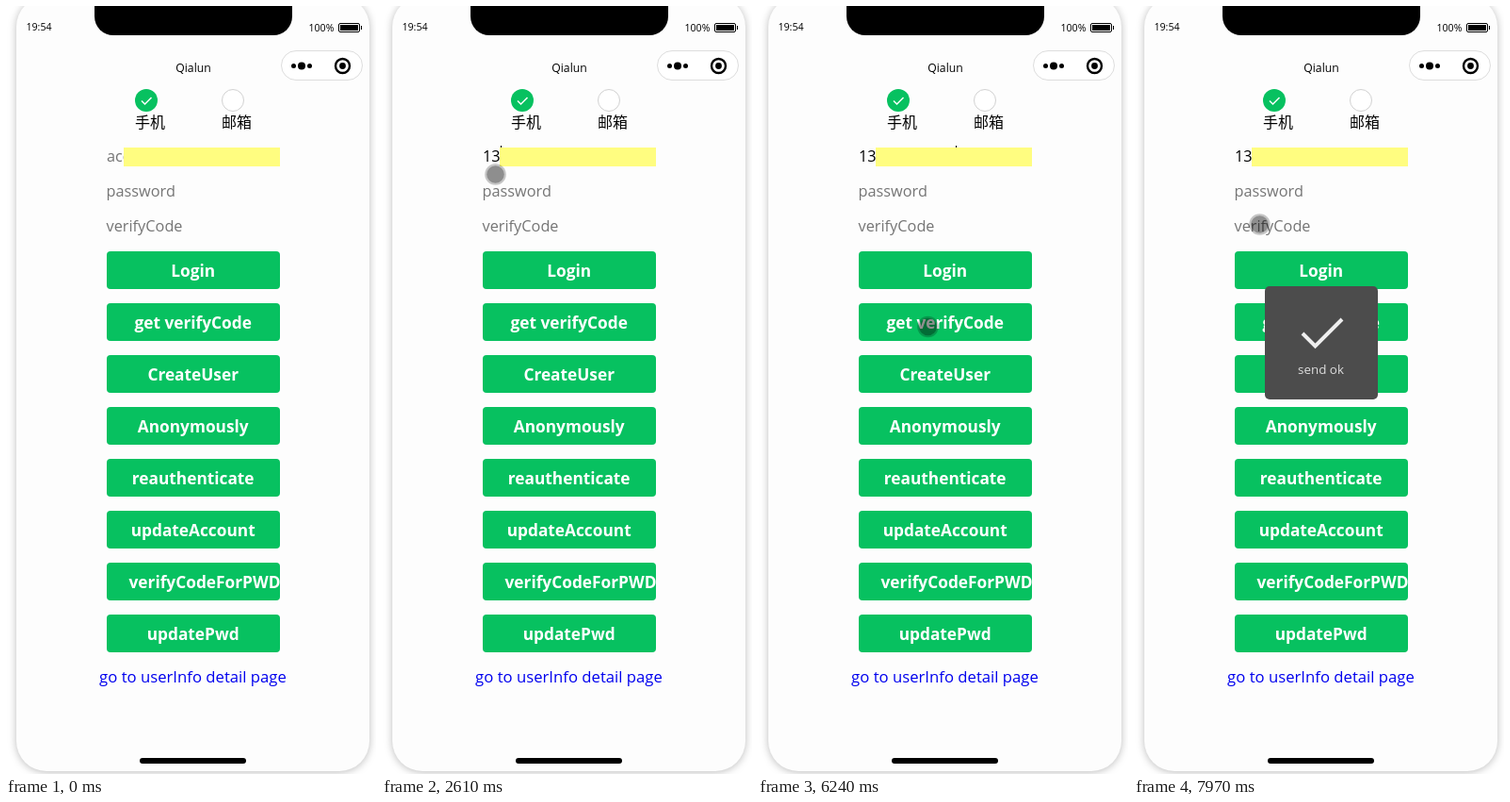
An HTML page that plays this animation: 393x814 px, repeating every 8000 ms.

```html
<!DOCTYPE html>
<html lang="en">
<head>
<meta charset="utf-8">
<title>Account form</title>
<style>
  html, body { margin: 0; height: 100%; overflow: hidden; background: #fff; }
  svg { display: block; font-family: "Open Sans", "Noto Sans CJK SC", "Noto Sans CJK", sans-serif; }
  .phone { fill: #fdfdfd; filter: drop-shadow(0 1px 4px #0004); }
  .status { font-size: 10.6px; }
  .field { font-size: 16.3px; fill: #757575; }
  .button { font-size: 17.3px; font-weight: 700; fill: #fff; }
  .mid { text-anchor: middle; }
</style>
</head>
<body>
<svg width="393" height="814">
  <rect class="phone" x="11" y="-10" width="375" height="821" rx="32"/>
  <path d="M94 0H304V11A20 20 0 0 1 284 31H114A20 20 0 0 1 94 11Z"/>
  <rect x="142" y="797" width="113" height="6" rx="3"/>

  <text class="status" x="21.5" y="26">19:54</text>
  <text class="status" x="321.5" y="27">100%</text>
  <rect x="353.5" y="18.5" width="22" height="9" rx="1.5" fill="none" stroke="#000"/>
  <path d="M355 20h19v6h-19zM377 21h1v4h-1z"/>

  <text class="mid" x="199" y="70" font-size="12.2">Qialun</text>
  <rect x="292.5" y="47.5" width="86" height="31" rx="15.5" fill="#fff" stroke="#ddd"/>
  <circle cx="305.5" cy="63.5" r="2.5"/>
  <circle cx="314" cy="63.5" r="4"/>
  <circle cx="322.5" cy="63.5" r="2.5"/>
  <circle cx="357.5" cy="63.5" r="7.5" fill="none" stroke="#000" stroke-width="2.4"/>
  <circle cx="357.5" cy="63.5" r="3.4"/>

  <circle cx="149" cy="100" r="12" fill="#07c160"/>
  <path d="M144 100.5l3.5 3.5 7-7" fill="none" stroke="#fff" stroke-width="1.5"/>
  <circle cx="241" cy="100" r="11.5" fill="#fff" stroke="#d1d1d1"/>
  <text x="137" y="129" font-size="16">手机</text>
  <text x="229" y="129" font-size="16">邮箱</text>

  <text id="account" class="field" x="107" y="165"></text>
  <rect id="caret" y="148" width="1" height="21"/>
  <rect x="125" y="150" width="166" height="20" fill="#fffd80"/>
  <text class="field" x="106.5" y="202">password</text>
  <text class="field" x="106.5" y="239">verifyCode</text>
  <g id="buttons"></g>
  <text class="mid" x="198.5" y="717" font-size="16.7" fill="#00e">go to userInfo detail page</text>

  <g id="toast">
    <rect x="139" y="297" width="120" height="120" rx="5" fill="#4c4c4c"/>
    <path d="M179 347l13.5 13.5L221 332" fill="none" stroke="#eee" stroke-width="4"/>
    <text class="mid" x="198.5" y="390" font-size="13.4" fill="#ddd">send ok</text>
  </g>
  <g id="pointer">
    <circle r="11.3" fill-opacity=".22"/>
    <circle r="9.3" fill-opacity=".28"/>
  </g>
</svg>
<script>
const $ = id => document.getElementById(id);
const LOOP = 8000, FOCUS = 1240, BLUR = 6600, BLINK = 505;
const keyTimes = [2530, 2610, 3530, 3630, 4010, 4240, 4370, 4600, 4730, 5010, 5060];

// Pointer path: time, x, y
const path = [
  [260, 324, 782], [310, 306, 672], [490, 141.5, 274], [700, 102, 176],
  [850, 101, 165], [1050, 106, 157], [1360, 114.5, 162], [1460, 120.5, 178.5],
  [5850, 120.5, 178.5], [6240, 180.5, 340], [6640, 177, 346], [7000, 177, 346],
  [7050, 169.5, 341], [7840, 137, 212], [7970, 133.5, 231.5]
];

const labels = ["Login", "get verifyCode", "CreateUser", "Anonymously",
  "reauthenticate", "updateAccount", "verifyCodeForPWD", "updatePwd"];
$("buttons").innerHTML = labels.map((label, i) => {
  const place = label.length > 15 ? 'x="23.5"' : 'x="91.7" text-anchor="middle"';
  return `<svg x="107" y="${260 + 55 * i}" width="184" height="40">
    <rect width="184" height="40" rx="4" fill="#07c160"/>
    <text class="button" ${place} y="27">${label}</text></svg>`;
}).join("");
const sendButton = $("buttons").children[1].querySelector("rect");

const show = (el, on) => el.setAttribute("visibility", on ? "visible" : "hidden");

function pointerAt(t) {
  const i = path.findIndex(p => p[0] > t);
  if (i < 0) return path[path.length - 1].slice(1);
  const [t0, x0, y0] = path[Math.max(i - 1, 0)], [t1, x1, y1] = path[i];
  const k = Math.max(0, (t - t0) / (t1 - t0 || 1));
  return [x0 + (x1 - x0) * k, y0 + (y1 - y0) * k];
}

function draw(t) {
  const typed = keyTimes.filter(k => k <= t).length;
  $("account").textContent = typed ? "13".slice(0, typed) : "account";
  $("account").style.fill = typed ? "#000" : "";

  // Every key press restarts the caret's blink
  const since = t - (typed ? keyTimes[typed - 1] : FOCUS);
  $("caret").setAttribute("x", Math.round(107 + 9.375 * typed));
  show($("caret"), since >= 0 && t < BLUR && Math.floor(since / BLINK) % 2 === 0);

  sendButton.setAttribute("fill", t >= 6400 && t < 6520 ? "#06ad56" : "#07c160");
  show($("toast"), t >= 7870);
  show($("pointer"), t >= path[0][0]);
  $("pointer").setAttribute("transform", `translate(${pointerAt(t)})`);
}

const start = performance.now();
(function tick() {
  draw((performance.now() - start) % LOOP);
  requestAnimationFrame(tick);
})();
</script>
</body>
</html>
```
